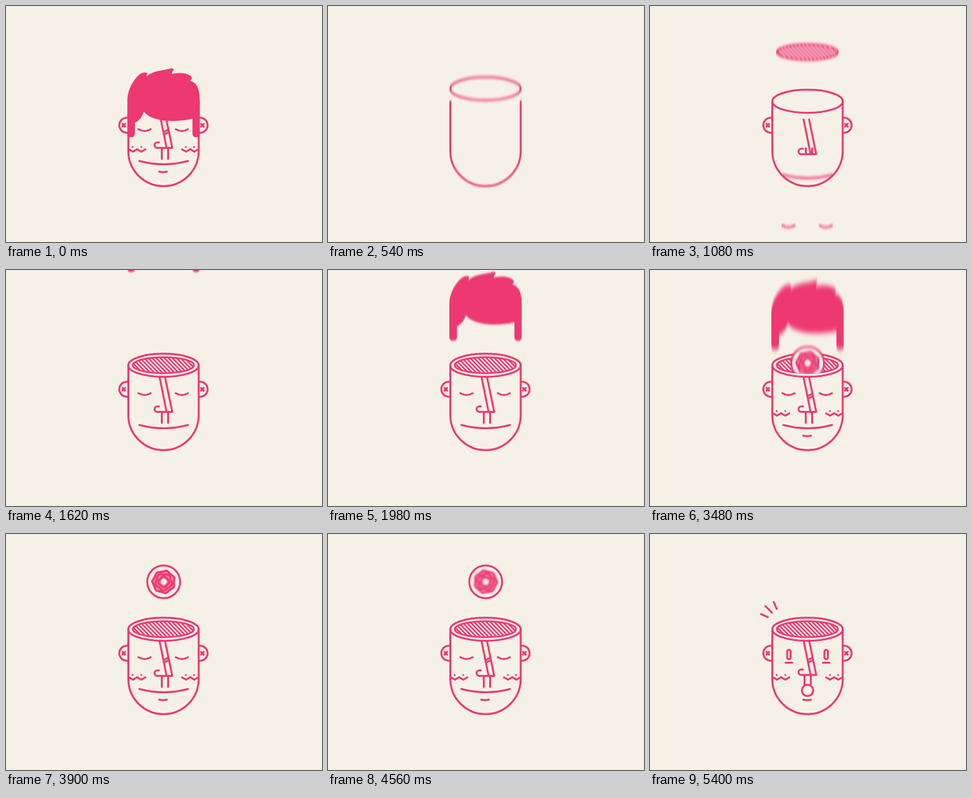
An HTML page for the animation above (6120 ms loop, 500 px wide and 375 px high).

```html
<!DOCTYPE html>
<html lang="en">
<head>
<meta charset="utf-8">
<title>Face assembly</title>
<style>
  html, body { margin: 0; width: 100%; height: 100%; overflow: hidden; background: #f6f1e6; }
  svg { display: block; width: 100%; height: 100%; }
  .line { fill: none; stroke: #ee3872; stroke-width: 3; stroke-linecap: round; stroke-linejoin: round; }
  .paper { fill: #f6f1e6; }
  .ink { fill: #ee3872; stroke: none; }
</style>
</head>
<body>
<svg viewBox="0 0 500 375" class="line">
  <defs id="defs">
    <clipPath id="bowl"><path d="M199 -60V151A50 14 0 0 0 299 151V-60Z"/></clipPath>
    <clipPath id="disc"><ellipse cx="249" cy="151.3" rx="48.5" ry="12.7"/></clipPath>
    <filter id="soft" x="-40%" y="-40%" width="180%" height="180%" color-interpolation-filters="sRGB"><feGaussianBlur stdDeviation="0.9"/></filter>
  </defs>
  <g id="head">
    <g id="earL"><g>
      <path d="M193.5 177.7A12 12 0 1 0 193.5 201.3"/>
      <path d="M184.3 187.4l4.2 4.2m0-4.2l-4.2 4.2"/>
    </g></g>
    <g id="earR"><g>
      <path d="M304.800 177.7A12 12 0 1 1 304.800 201.3"/>
      <path d="M308.600 187.4l4.2 4.2m0-4.2l-4.2 4.2"/>
    </g></g>
    <g id="cup"><g><path class="paper" d="M193.5 151.4V230.5a55.7 55.7 0 0 0 111.4 0V151.4"/></g></g>
    <g id="nose"><g>
      <path d="M243 170.5L254 225M242 216.8h-2.700a4.300 4.300 0 0 0 0 8.600H263L251.700 170.5"/>
    </g></g>
    <path id="plaster" pathLength="1" d="M249.8 200L255.600 197.100M250.600 204L256.400 201.100"/>
    <path id="legs"/>
    <g id="eyes"><g><path d="M209.5 195.8q9.7 5.8 19.4 0M268.5 195.8q9.7 5.8 19.4 0"/></g></g>
    <g id="mouth"><g><path d="M211 246.3q38.5 10.5 77 0"/></g></g>
    <path id="chin" pathLength="1" d="M242.5 263.3q6.500 1.400 12 0"/>
    <path id="cheekL" pathLength="1" d="M195.5 228.300l5.500 3.200 6.500-4 6.500 4 6.500-3.600"/>
    <path id="cheekR" pathLength="1" d="M303.500 228.300l-5.500 3.200-6.500-4-6.500 4-6.500-3.600"/>
    <g id="dots" class="ink">
      <circle cx="200.5" cy="224"/><circle cx="214" cy="224"/>
      <circle cx="284.5" cy="224"/><circle cx="297.5" cy="224"/>
    </g>
    <g id="awake">
      <rect x="217" y="184" width="5.5" height="15" rx="2.75"/>
      <rect x="276" y="184" width="5.5" height="15" rx="2.75"/>
      <path d="M214.5 204.4H225M273.5 204.4H284"/>
      <circle cx="249.3" cy="248.5" r="9"/>
    </g>
    <g id="rim"><g><ellipse cx="249.2" cy="151.4" rx="55.7" ry="18.3"/></g></g>
    <g id="hatch"><g>
      <path id="stripes" stroke-width="2.5" clip-path="url(#disc)"/>
      <ellipse cx="249" cy="151.3" rx="48.5" ry="12.7" stroke-width="2.6"/>
    </g></g>
  </g>
  <g clip-path="url(#bowl)">
    <g id="ball"><g>
      <circle class="paper" r="26"/>
      <g id="brain">
        <circle r="11.5" stroke-width="14" stroke-opacity=".6"/>
      </g>
    </g></g>
  </g>
  <path id="sparks" pathLength="1" d="M200.500 119L195.800 108M193 125L182.500 114.500M186.500 132L175.500 127.300"/>
  <g id="hair"><g>
    <path class="ink" d="M192 151C192 132 203 114 214 107Q220 104 224 107Q222 109 222.500 112
      C233 102 249 103 261 99Q267 99 264.500 103Q261 106 263 108
      C276 105 288 107 293 112Q296 116 291 118.500C303 122 306.500 133 306.500 151
      V202.500Q306.500 208.500 300.700 208.500T295 202.500V179
      C267 186 231 184 218 168Q214 181 204 185.500V202.500Q204 208.500 198 208.500T192 202.500Z"/>
  </g></g>
</svg>
<script>
const LOOP = 6120, STEP = 60;
const $ = id => document.getElementById(id);

// piecewise linear value from [time, value] pairs
function at(keys, t) {
  if (t <= keys[0][0]) return keys[0][1];
  for (let i = 1; i < keys.length; i++) {
    const [a, u] = keys[i - 1], [b, v] = keys[i];
    if (t < b) return u + (v - u) * (t - a) / (b - a);
  }
  return keys[keys.length - 1][1];
}
const ramp = (t, a, b) => Math.min(1, Math.max(0, (t - a) / (b - a)));
const show = (id, on) => { $(id).style.display = on ? '' : 'none'; };

// travelling parts with directional blur
const movers = [];
function mover(id, keys, axis = 'y', x = 0) {
  $('defs').insertAdjacentHTML('beforeend',
    `<filter id="${id}Blur" filterUnits="userSpaceOnUse" x="-60" y="-60" width="620" height="495"
      color-interpolation-filters="sRGB"><feGaussianBlur/></filter>`);
  movers.push({ el: $(id), part: $(id).firstElementChild, blur: $(id + 'Blur').firstElementChild, keys, axis, x });
}
function move({ el, part, blur, keys, axis, x }, t) {
  const v = at(keys, t);
  const s = Math.abs(at(keys, t + 30) - at(keys, t - 30)) * 0.1;
  part.setAttribute('transform', axis === 'x' ? `translate(${v} 0)` : `translate(${x} ${v})`);
  if (s > 0.3) {
    blur.setAttribute('stdDeviation', axis === 'x' ? `${s} 0` : `0 ${s}`);
    el.setAttribute('filter', `url(#${el.id}Blur)`);
  } else el.removeAttribute('filter');
}

mover('cup', [[60, 250], [540, 0]]);
mover('rim', [[60, -180], [600, 0]]);
mover('earL', [[590, -202], [660, -176], [1000, 0]], 'x');
mover('earR', [[590, 202], [660, 176], [1000, 0]], 'x');
mover('nose', [[660, -230], [960, 0], [1080, 10], [1200, 0], [4800, 0], [4860, -1.5]]);
mover('mouth', [[740, 145], [1080, 22], [1150, 0]]);
mover('hatch', [[780, -172], [1080, -78], [1320, 0]]);
mover('eyes', [[960, 192], [1080, 153], [1551, 0]]);
mover('hair', [[1560, -222], [1620, -205], [1980, -96], [2300, 0], [3360, 0], [3480, -82], [3720, -270]]);
mover('ball', [[3360, 200], [3480, 148], [3600, 108], [3720, 86], [3900, 76], [4560, 76], [4680, 48],
  [4740, 60], [4800, 110], [4860, 200]], 'y', 249.5);

let lines = '';
for (let x = 170; x < 310; x += 6.4) lines += `M${x} 136l29 30`;
$('stripes').setAttribute('d', lines);

// wavy rings around a small hole
for (const [r, lobes, amp] of [[17, 7, 1.2], [12.5, 5, 1], [8, 4, 0.6]]) {
  let ring = '';
  for (let i = 0; i < 60; i++) {
    const a = i * Math.PI / 30, q = r + amp * Math.sin(lobes * a + r);
    ring += `${i ? 'L' : 'M'}${(q * Math.cos(a)).toFixed(2)} ${(q * Math.sin(a)).toFixed(2)}`;
  }
  $('brain').insertAdjacentHTML('beforeend', `<path d="${ring}Z"/>`);
}

function grow(id, p) {
  show(id, p > 0);
  $(id).setAttribute('stroke-dasharray', p < 1 ? `${p} 2` : 'none');
}

function draw(now) {
  const tick = Math.floor(now % LOOP / STEP) * STEP;
  const t = tick < STEP ? 3300 : tick;   // opens on the finished face
  const awake = t >= 4860;

  movers.forEach(m => move(m, t));
  show('awake', awake);
  show('eyes', !awake);
  show('mouth', !awake);

  const leg = at([[1020, 0], [1080, 0.55], [1200, 1]], t);
  const [x, top, end] = awake ? [244.5, 224, 239] : [246.5, 226, 226 + 17 * leg];
  show('legs', leg > 0);
  $('legs').setAttribute('d', `M${x} ${top}V${end}M${x + 10} ${top}V${end}`);

  grow('chin', ramp(t, 2040, 2220));
  grow('cheekL', ramp(t, 2160, 2400));
  grow('cheekR', ramp(t, 2160, 2400));
  grow('plaster', ramp(t, 2280, 2400));
  grow('sparks', ramp(t, 4860, 5040));
  [...$('dots').children].forEach((dot, i) =>
    dot.setAttribute('r', 1.5 * ramp(t, 2640 + i * 160, 2800 + i * 160)));

  const spin = ramp(t, 4020, 4860);
  $('brain').setAttribute('transform', `rotate(${spin * 1080})`);
  if (spin > 0) $('brain').setAttribute('filter', 'url(#soft)');
  else $('brain').removeAttribute('filter');

  const dip = at([[4800, 0], [4860, 2], [4980, 0]], t);
  const pop = at([[5220, 0], [5280, 1], [5340, 0.4], [5400, 0]], t);
  $('head').setAttribute('transform',
    `translate(249.5 ${178 + dip}) scale(${1 + 0.035 * pop} ${1 + 0.064 * pop}) translate(-249.5 -178)`);
}

const start = performance.now();
(function frame() {
  draw(performance.now() - start);
  requestAnimationFrame(frame);
})();
</script>
</body>
</html>
```
